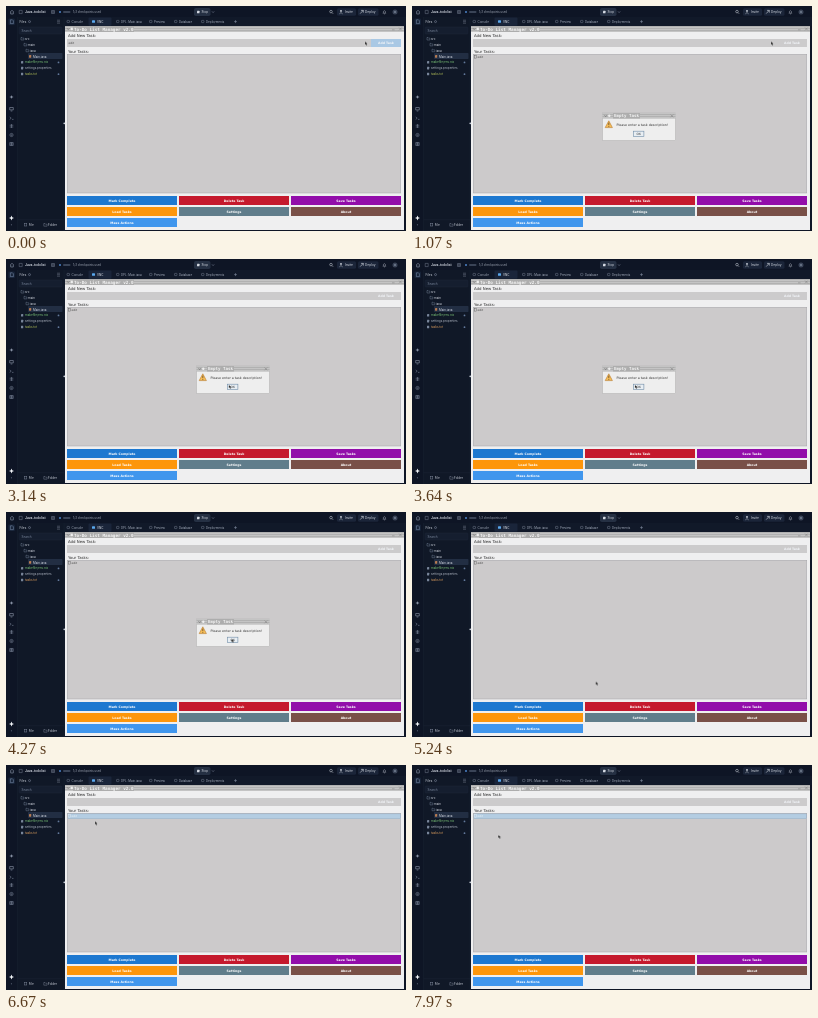
These frames come from a looping animation (400 by 225 pixels, 8 s). An HTML page:

```html
<!DOCTYPE html>
<html lang="en">
<head>
<meta charset="utf-8">
<title>To-Do List Manager</title>
<style>
  html, body { margin: 0; width: 100%; height: 100%; overflow: hidden; background: #0e1525; }
  svg { display: block; width: 100vw; height: 100vh; }
  text { font: 3px Inter, sans-serif; white-space: pre; }
  .bold { font-family: "DejaVu Sans", sans-serif; font-weight: 700; }
  .plain { font-family: "DejaVu Sans", sans-serif; }
  .mono { font-family: "DejaVu Sans Mono", monospace; font-weight: 700; }
</style>
</head>
<body>
<svg id="stage" viewBox="0 0 400 225">
  <defs>
    <pattern id="stripes" width="2" height="2" patternUnits="userSpaceOnUse">
      <rect width="2" height="2" fill="#c4c4c4"/>
      <rect width="2" height=".8" fill="#acacac"/>
    </pattern>
  </defs>
</svg>
<script>
const LOOP = 8000;
const stage = document.getElementById('stage');

function add(parent, tag, attrs, content) {
  const el = document.createElementNS('http://www.w3.org/2000/svg', tag);
  for (const k in attrs) el.setAttribute(k, attrs[k]);
  if (content) el.textContent = content;
  return parent.appendChild(el);
}
const group = (parent = stage) => add(parent, 'g', {});
const box = (p, x, y, width, height, fill, more) =>
  add(p, 'rect', { x, y, width, height, fill, ...more });
const line = (p, d, stroke, w = 0.5) =>
  add(p, 'path', { d, stroke, 'stroke-width': w, fill: 'none' });
const dot = (p, cx, cy, r, fill, more) => add(p, 'circle', { cx, cy, r, fill, ...more });
const ring = (p, x, y, r, stroke) =>
  dot(p, x, y, r, 'none', { stroke, 'stroke-width': 0.5 });
function label(p, x, y, str, fill, size = 3, cls = '', anchor = 'start') {
  const el = add(p, 'text', { x, y, fill, class: cls, 'text-anchor': anchor }, str);
  el.style.fontSize = size + 'px';
  return el;
}

// Hard changes: steps are [time, value], the first at 0.
function switchAt(el, prop, steps) {
  const frames = steps.map(([t, v]) => ({ offset: t / LOOP, [prop]: v, easing: 'step-end' }));
  frames.push({ offset: 1, [prop]: steps[steps.length - 1][1] });
  el.animate(frames, { duration: LOOP, iterations: Infinity });
}
const showFrom = (el, from, to = LOOP) =>
  switchAt(el, 'opacity', to < LOOP ? [[0, 0], [from, 1], [to, 0]] : [[0, 0], [from, 1]]);

const PALE = '#d5dae3', DIM = '#8b95a8';

function header(g) {
  box(g, 0, 0, 400, 225, '#0e1525');
  line(g, 'M4 6.2l2-1.9 2 1.9M4.7 6v2h2.6v-2', DIM, 0.6);
  line(g, 'M13.2 4.4h3v3.2h-3z', DIM, 0.4);
  label(g, 19, 7.2, 'Java-todolist', PALE, 3.25).style.fontWeight = 600;
  line(g, 'M45.5 4.5h3v3h-3zM47 4.5v3M45.5 6h3', DIM, 0.4);
  dot(g, 54, 6, 1, '#4d83c9');
  box(g, 57, 5.2, 7.5, 1.6, '#4a5468', { rx: 0.8 });
  label(g, 67, 7.1, '1/3 checkpoints used', '#a0a8b6', 2.8);

  box(g, 188, 2, 16.5, 8, '#253043', { rx: 1.8 });
  box(g, 191, 4.8, 2.5, 2.5, PALE, { rx: 0.4 });
  label(g, 195.5, 7.1, 'Stop', PALE, 3.1);
  line(g, 'M206 5.4l1.1 1.2 1.1-1.2', DIM);

  ring(g, 325, 5.6, 1.3, PALE);
  line(g, 'M326 6.6l1.2 1.2', PALE);
  box(g, 331, 2.2, 19, 7.6, '#1b2539', { rx: 1.5 });
  dot(g, 335, 4.9, 0.9, PALE);
  line(g, 'M333.4 7.8q1.6-2.5 3.2 0', PALE);
  label(g, 338.8, 7.1, 'Invite', PALE, 3.2);
  box(g, 352, 2.2, 20.5, 7.6, '#1b2539', { rx: 1.5 });
  line(g, 'M354.2 7.6l3-3.2M355 4.4h2.3v2.3', PALE, 0.6);
  label(g, 359, 7.1, 'Deploy', PALE, 3.2);
  line(g, 'M376.9 7.2h3l-.5-.7v-1.1q-1-1.5-2 0v1.1zM378 8h.8', PALE, 0.4);
  dot(g, 389, 6, 2.5, '#3b4558');
  dot(g, 389, 6, 1.1, '#707b8e');
}

function tabs(g) {
  box(g, 58.5, 11, 341.5, 9, '#111929');
  box(g, 82.5, 11.4, 23, 8.4, '#1a253a', { rx: 1 });
  const items = [['Console', 65.5], ['VNC', 91], ['DPL: Main.java', 115],
    ['Preview', 148], ['Database', 173], ['Deployments', 200]];
  items.forEach(([name, x], i) => {
    const color = i === 1 ? '#e4e8ef' : '#a5aebd';
    label(g, x, 16.5, name, color, 2.95);
    if (i === 1) box(g, 86, 14.2, 3, 2.5, '#59a8ee', { rx: 0.5 });
    else box(g, x - 4.5, 14.4, 2.5, 2.2, 'none', { rx: 0.5, stroke: DIM, 'stroke-width': 0.4 });
  });
  line(g, 'M228 15.6h3M229.5 14.1v3', DIM);
}

function sidebar(g) {
  box(g, 11.5, 11, 46.5, 214, '#101827');
  line(g, 'M11.4 11V225M58.2 11V225', '#1f293b', 0.4);
  label(g, 13.5, 16.6, 'Files', PALE, 3.1);
  ring(g, 23.5, 15.6, 1, DIM);
  line(g, 'M51 14.2h3M51 15.7h3M51 17.2h3', DIM, 0.4);
  box(g, 13, 21, 43, 7, '#151e2f', { rx: 1, stroke: '#232e42', 'stroke-width': 0.3 });
  label(g, 15.5, 25.6, 'Search', '#78849a', 3);

  box(g, 22, 47, 34.5, 6, '#222e43', { rx: 0.8 });
  const rows = [['src', 19, PALE], ['main', 22, PALE], ['java', 24, PALE],
    ['Main.java', 27, PALE], ['makefile/env.nix', 19, '#7cc578'],
    ['settings.properties', 19, '#b7beca'], ['tasks.txt', 19, '#b9c65b']];
  rows.forEach(([name, x, color], i) => {
    const y = 33.9 + i * 5.87;
    const el = label(g, x, y, name, color, 3);
    if (i < 3) line(g, `M${x - 4} ${y - 2.4}h1l.5.6h1.4v1.9h-2.9z`, '#7f8da5', 0.4);
    else box(g, x - 4, y - 2.4, 2.2, 2.6, i === 3 ? '#b67a51' : '#78859a', { rx: 0.4 });
    if (i === 6) switchAt(el, 'fill', [[0, color], [3540, '#e1a15f']]);
  });
  dot(g, 52.5, 56.4, 0.9, '#62799b');
  dot(g, 52.5, 68.2, 0.9, '#62799b');

  line(g, 'M11.5 213.8H58', '#1f293b', 0.4);
  box(g, 18.6, 217.2, 2.2, 2.8, 'none', { stroke: DIM, 'stroke-width': 0.4 });
  label(g, 22.8, 219.8, 'File', PALE, 3);
  line(g, 'M37.8 217.5h1.2l.6.7h1.5v2h-3.3z', DIM, 0.4);
  label(g, 42, 219.8, 'Folder', PALE, 3);

  box(g, 2.4, 12.4, 6.5, 6.5, '#182439', { rx: 1 });
  line(g, 'M4.4 13.8h2l1 1v2.8h-3z', '#9fb6d6', 0.4);
  dot(g, 5.5, 91, 1, DIM);
  line(g, 'M3.7 91h3.6M5.5 89.2v3.6', DIM, 0.4);
  line(g, 'M3.7 101.5h3.6v2.4h-3.6zM4.7 105h1.6', DIM, 0.6);
  line(g, 'M3.7 111l1.5 1.2-1.5 1.2M6 113.4h1.5', DIM);
  line(g, 'M3.7 119.2h3.6M3.7 121h3.6M5.5 118v4', DIM);
  ring(g, 5.5, 129, 1.6, DIM);
  dot(g, 5.5, 129, 0.5, DIM);
  line(g, 'M3.8 136.5h3.4v3h-3.4zM5.5 136.5v3M3.8 138h3.4', DIM);
  add(g, 'path', { d: 'M5.5 209.5l.7 1.8 1.8.7-1.8.7-.7 1.8-.7-1.8-1.8-.7 1.8-.7z', fill: '#f2f4f8' });
  label(g, 5.5, 220, '?', DIM, 2.6, '', 'middle');
}

function titleBar(g, x, y, w, h, title, textX, size, textW) {
  box(g, x, y, w, h, 'url(#stripes)');
  box(g, textX - 1, y, textW, h, '#adadad');
  line(g, `M${x + 2} ${y + 2.2}l1.2 1.4 1.2-1.4`, '#555');
  dot(g, x + 6.8, y + h / 2, 1.2, '#eee');
  label(g, textX, y + h - 1.4, title, '#f4f4f4', size, 'mono');
  const bx = x + w - 5;
  line(g, `M${bx} ${y + 1.5}l2.8 2.8M${bx + 2.8} ${y + 1.5}l-2.8 2.8`, '#707070', 0.4);
}

function appWindow(g) {
  box(g, 59, 20, 339, 204, '#efeff0');
  titleBar(g, 59, 20, 339, 6, 'To-Do List Manager v2.0', 68, 4.3, 61);
  line(g, 'M386 23.8h2.6', '#707070', 0.4);

  label(g, 62, 31.2, 'Add New Task:', '#2a2a2a', 3.9, 'plain');
  box(g, 61, 33, 304, 8, '#cccbcc');
  const typed = label(g, 62.5, 38.4, 'edit', '#414141', 2.9, 'plain');
  switchAt(typed, 'opacity', [[0, 1], [40, 0]]);
  const addBtn = box(g, 365, 33, 30, 8, '#a9c8e4');
  switchAt(addBtn, 'fill', [[0, '#a9c8e4'], [40, '#cccbcc']]);
  label(g, 380, 38.4, 'Add Task', '#f1f4f8', 3.17, 'bold', 'middle');

  label(g, 62, 47.4, 'Your Tasks:', '#2a2a2a', 3.85, 'plain');
  box(g, 61.25, 48.25, 333.5, 138.75, '#cccacb', { stroke: '#a2a2a6', 'stroke-width': 0.5 });
  const picked = box(g, 62, 48.9, 332.4, 4.7, '#b4cde2', { stroke: '#8aa9c5', 'stroke-width': 0.4 });
  showFrom(picked, 5970);
  const row = group(g);
  const mark = box(row, 62.4, 49.7, 2.2, 2.4, 'none', { stroke: '#555', 'stroke-width': 0.4 });
  const item = label(row, 65.5, 52, 'edit', '#444', 2.9, 'plain');
  showFrom(row, 120);
  switchAt(mark, 'stroke', [[0, '#555'], [5970, '#edf3f8']]);
  switchAt(item, 'fill', [[0, '#444'], [5970, '#edf3f8']]);

  const buttons = [['Mark Complete', '#1d78d0'], ['Delete Task', '#c5192d'], ['Save Tasks', '#920daa'],
    ['Load Tasks', '#fd960b'], ['Settings', '#607d8b'], ['About', '#795048'], ['Mass Actions', '#4096ed']];
  buttons.forEach(([name, color], i) => {
    const x = 61 + (i % 3) * 112, y = 190 + Math.floor(i / 3) * 11;
    box(g, x, y, 110, 9, color);
    label(g, x + 55, y + 5.7, name, '#fff', 3.17, 'bold', 'middle');
  });
  dot(g, 58.3, 117.3, 0.9, '#c8ced8');
}

function dialog(g) {
  box(g, 190.5, 107, 73, 27.5, '#eeeeee', { stroke: '#b0b0b0', 'stroke-width': 0.5 });
  titleBar(g, 190.5, 107, 73, 5.5, 'Empty Task', 202, 4.15, 27);
  const body = group(g);
  add(body, 'path', {
    d: 'M196.8 114.8l3.6 6.8h-7.2z', fill: '#f5bd58',
    stroke: '#b87a2c', 'stroke-width': 0.6, 'stroke-linejoin': 'round'
  });
  line(body, 'M196.8 116.6v2.6M196.8 120v.8', '#4d3820', 0.7);
  label(body, 204.5, 119.8, 'Please enter a task description!', '#2e2e2e', 3.25, 'plain');
  const ok = box(body, 221.4, 125.2, 10.5, 5.5, '#e8eef3', { stroke: '#6f8ba6', 'stroke-width': 0.6 });
  label(body, 226.7, 129.1, 'OK', '#333', 3, 'plain', 'middle');
  switchAt(ok, 'fill', [[0, '#e8eef3'], [4370, '#b4c6d6'], [4470, '#e8eef3']]);
  showFrom(body, 470);
  showFrom(g, 400, 4640);
}

function cursor(g) {
  add(g, 'path', {
    d: 'M0 0v3.1l.8-.7.7 1.4.7-.4-.7-1.2h1z',
    fill: '#111', stroke: '#eee', 'stroke-width': 0.15
  });
  const path = [
    [0, 359, 35.6], [1770, 359, 35.6, 'ease-in-out'], [2570, 224, 126.4], [2870, 222.8, 126],
    [3540, 222.8, 126, 'ease-in-out'], [4240, 225.5, 127], [5110, 225.5, 127],
    [5240, 183.8, 169.6, 'ease-out'], [5970, 152.3, 196.5, 'ease-in-out'],
    [6770, 87, 52, 'ease-out'], [7070, 86.3, 51], [7740, 86.3, 51, 'ease-in-out'],
    [7970, 86.3, 70], [8000, 86.3, 70]
  ];
  g.animate(path.map(([t, x, y, easing = 'linear']) => ({
    offset: t / LOOP, transform: `translate(${x}px, ${y}px)`, easing
  })), { duration: LOOP, iterations: Infinity });
}

[header, tabs, sidebar, appWindow, dialog, cursor].forEach(draw => draw(group()));
</script>
</body>
</html>
```
